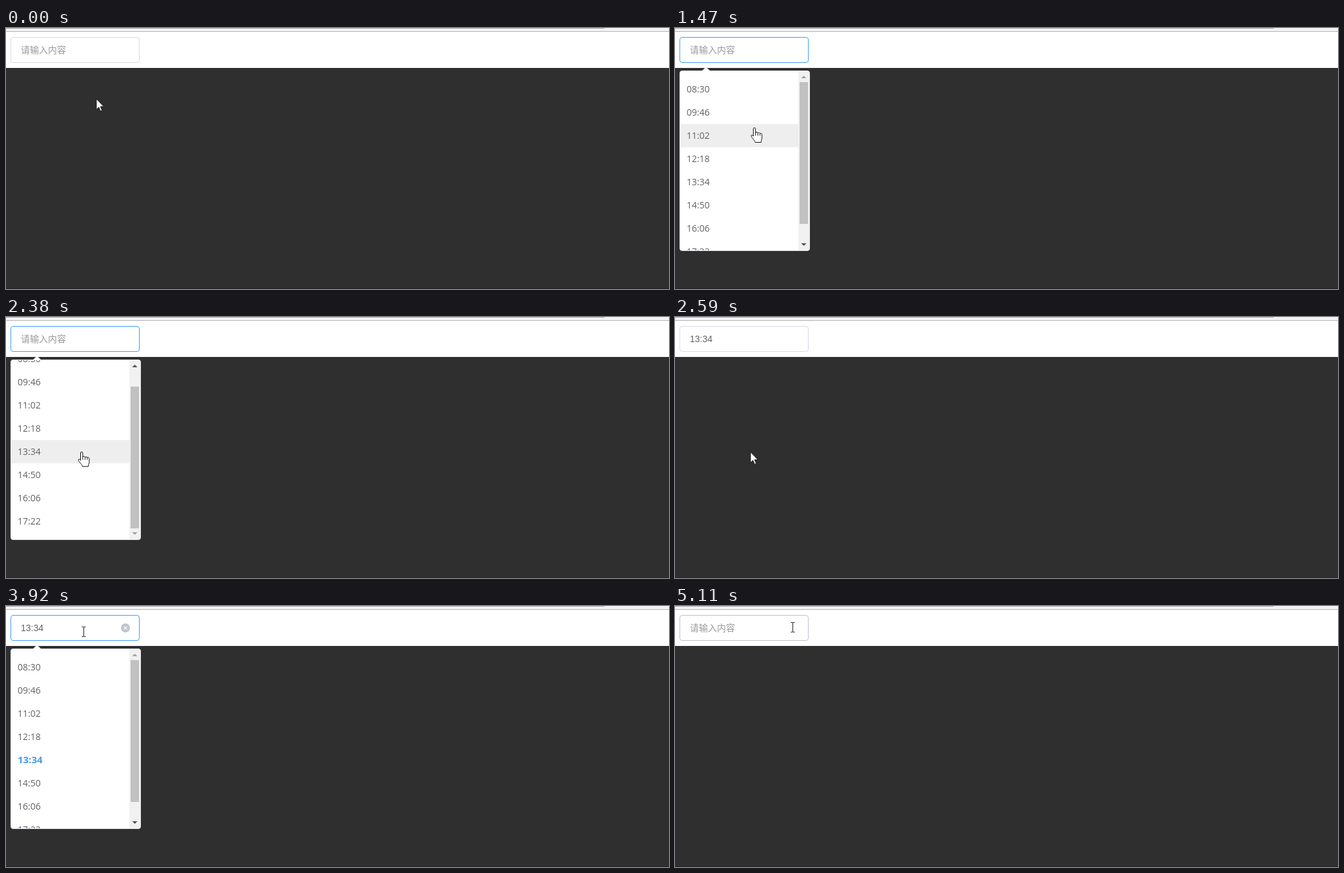
Write an HTML page that moves like this. It is 1027 px wide and 405 px high and loops after 5.67 s.

```html
<!DOCTYPE html>
<html lang="zh">
<head>
<meta charset="utf-8">
<title>时间选择</title>
<style>
  html, body { margin: 0; width: 100%; height: 100%; overflow: hidden; background: #fff; }
  svg { display: block; }
  #placeholder { font: 14px "Noto Sans CJK SC", "Noto Sans CJK", sans-serif; fill: #999; }
  #value { font: 14px "Liberation Sans", Arial, sans-serif; fill: #606266; }
  #rows text { font: 14px "Open Sans", "Noto Sans", sans-serif; fill: #606266; }
  #rows text.selected { font-size: 15px; font-weight: 700; fill: #4a9be6; }
  .crisp { shape-rendering: crispEdges; }
</style>
</head>
<body>
<svg width="1027" height="405" viewBox="0 0 1027 405">
  <g class="crisp">
    <rect width="1027" height="405" fill="#fff"/>
    <rect width="1027" height="5" fill="#f2f2f2"/>
    <rect width="927" height="1" fill="#a9a9a9"/>
    <rect y="5" width="1027" height="1" fill="#b4b4b4"/>
    <rect y="62" width="1027" height="343" fill="#2f2f2f"/>
    <rect y="404" width="1027" height="1" fill="#222"/>
  </g>

  <rect id="field" x="7.5" y="14.5" width="199" height="39" rx="3.5" fill="#fff"/>
  <text id="placeholder" x="23" y="39">请输入内容</text>
  <text id="value" x="23" y="39">13:34</text>
  <g id="clear">
    <circle cx="185" cy="34" r="7" fill="#c0c4cc"/>
    <path d="M182.6 31.6l4.8 4.8m0-4.8l-4.8 4.8" stroke="#fff" stroke-width="1.2"/>
  </g>
  <rect id="caret" class="crisp" y="26" width="1" height="16" fill="#333"/>

  <g id="dropdown">
    <rect x="7.5" y="66.5" width="201" height="279" rx="3.5" fill="#fff" stroke="#e4e7ed"/>
    <path d="M41 67l7-6.5 7 6.5z" fill="#fff"/>
    <svg x="8" y="67" width="200" height="278">
      <g id="rows"><rect id="hover" class="crisp" width="183" height="36" fill="#eee"/></g>
      <rect x="183" width="17" height="278" fill="#f1f1f1"/>
      <rect id="thumb" class="crisp" x="185" width="13" height="220" fill="#c1c1c1"/>
      <path id="up" d="M187.5 11l4-4 4 4z"/>
      <path id="down" d="M187.5 267l4 4 4-4z"/>
    </svg>
  </g>

  <g id="pointer">
    <path id="arrow" d="M0 0v16.5l3.8-3.6 2.6 6.1 2.5-1-2.6-6h5.2z" fill="#fff" stroke="#111" stroke-width=".9"/>
    <path id="beam" d="M-3 -7.5h2.5l.5.5.5-.5h2.5M0 -7v14M-3 7.5h2.5l.5-.5.5.5h2.5" fill="none" stroke="#222"/>
    <path id="hand" d="M-1.5 13V1.5a1.7 1.7 0 0 1 3.4 0V8c0-2 3.6-1.6 3.6.5 0-1.8 3.4-1.4 3.4.7 0-1.6 3-1.2 3 1v6c0 2-1.5 3-1.5 6.3h-9c0-2.5-5.5-7-6.2-9.8-.5-2 2.2-2.5 3.3.3zM1.9 8v4M5.5 8.5v3.5M8.9 9.2v3" fill="#fff" stroke="#111"/>
  </g>
</svg>
<script>
const LOOP = 5670, STEP = 70, ROW = 36, LIST_TOP = 77;
const GREY = '#d8dae6', HOVER = '#c0c0d0', BLUE = '#409eff';
const $ = id => document.getElementById(id);
const show = (id, on) => $(id).setAttribute('visibility', on ? 'inherit' : 'hidden');
const set = (id, name, value) => $(id).setAttribute(name, value);
const within = (t, ...spans) => spans.some(([from, to]) => t >= from && t < to);

// [time, x, y]
const pointerPath = [
  [280, 140, 110], [560, 112.5, 26],
  [1190, 112.5, 26], [1610, 128, 219.5],
  [2170, 128, 219.5], [2380, 117, 209.5],
  [2940, 117, 209.5], [3360, 120.5, 40],
  [4130, 120.5, 40], [4270, 161.5, 32],
  [4340, 161.5, 32], [4690, 182.5, 33]
];
// [time, offset]
const scrollPath = [[1610, 0], [1680, 3], [1820, 21], [1890, 27], [1960, 29], [2030, 30]];

function sample(path, t) {
  const i = path.findIndex(key => key[0] > t);
  if (i < 0) return path.at(-1).slice(1);
  if (i === 0) return path[0].slice(1);
  const a = path[i - 1], b = path[i], k = (t - a[0]) / (b[0] - a[0]);
  return a.slice(1).map((v, n) => v + (b[n + 1] - v) * k);
}

const labels = Array.from({ length: 8 }, (_, i) => {
  const minutes = 510 + 76 * i;
  const pad = n => String(n).padStart(2, '0');
  const text = document.createElementNS($('rows').namespaceURI, 'text');
  text.textContent = pad(Math.floor(minutes / 60)) + ':' + pad(minutes % 60);
  text.setAttribute('x', 10);
  text.setAttribute('y', 33 + ROW * i);
  return $('rows').appendChild(text);
});

function borderColor(t, hovered) {
  for (const opened of [840, 3430]) {
    if (within(t, [opened, opened + 70])) return '#b2bccd';
    if (within(t, [opened + 70, opened + 140])) return '#79adea';
  }
  if (within(t, [980, 2590], [3570, 4970])) return BLUE;
  if (within(t, [4970, 5110])) return '#80afe8';
  return hovered ? HOVER : GREY;
}

function render(time) {
  const t = Math.floor(time / STEP) * STEP;
  const [x, y] = sample(pointerPath, t);
  const open = within(t, [840, 2590], [3430, 4830]);
  const filled = within(t, [2590, 4760]);
  const overField = y > 14 && y < 54;
  const overList = open && y > 67;
  const scroll = t < 2590 ? sample(scrollPath, t)[0] : 0;

  set('field', 'stroke', borderColor(t, overField));
  show('placeholder', !filled);
  show('value', filled);
  show('clear', filled && overField);
  show('caret', within(t, [840, 1330], [1820, 2380], [3430, 3920], [4480, 4970]));
  set('caret', 'x', filled ? 58 : 23);

  show('dropdown', open);
  // The highlighted row catches up only after the wheel scroll has mostly settled.
  const row = Math.floor((y - LIST_TOP + (t < 1890 ? 0 : scroll)) / ROW);
  show('hover', overList && row >= 0);
  set('hover', 'y', 10 + ROW * row);
  set('rows', 'transform', `translate(0 ${-Math.round(scroll)})`);
  set('thumb', 'y', 17 + Math.floor(scroll * 0.8));
  set('up', 'fill', scroll > 0 ? '#505050' : '#a3a3a3');
  set('down', 'fill', scroll < 30 ? '#505050' : '#a3a3a3');
  labels[4].classList.toggle('selected', filled);

  const shape = overList || (filled && overField && x > 178) ? 'hand'
    : overField ? 'beam' : 'arrow';
  for (const id of ['arrow', 'beam', 'hand']) show(id, id === shape);
  set('pointer', 'transform', `translate(${x} ${y})`);
}

// The hidden dropdown must also hide its highlight, so "inherit" is used throughout.
const start = performance.now();
function tick() {
  render((performance.now() - start) % LOOP);
  requestAnimationFrame(tick);
}
tick();
</script>
</body>
</html>
```
